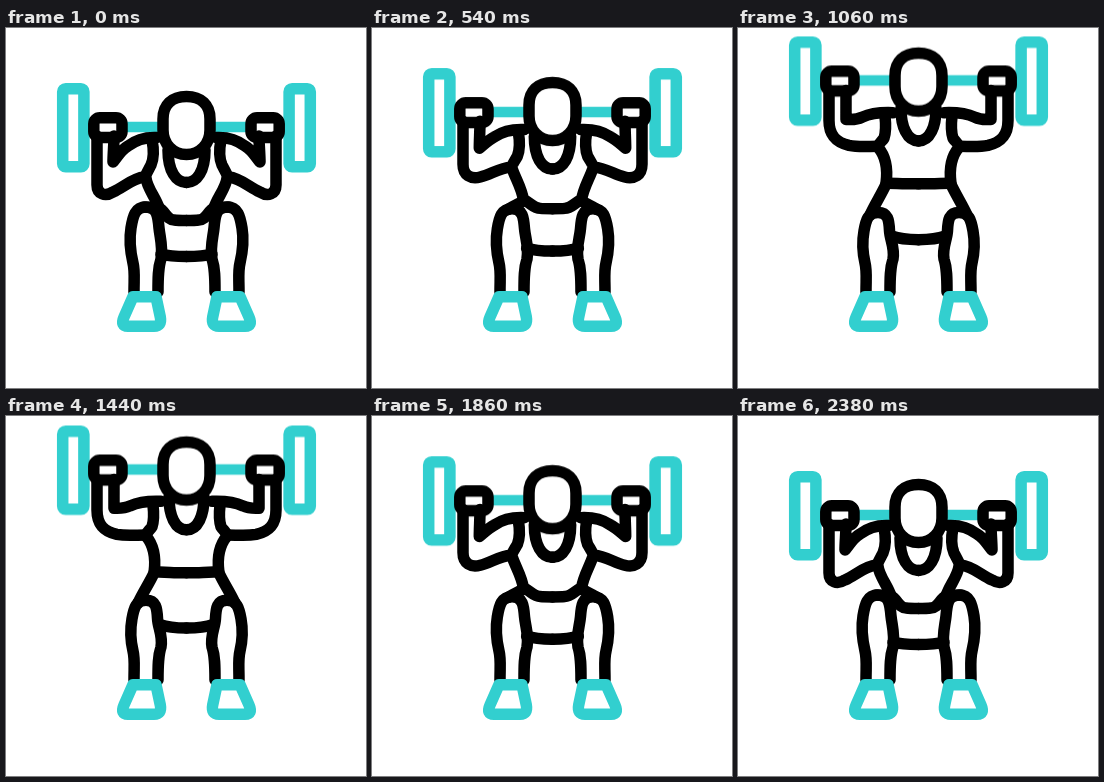
An HTML page without scripts that plays this animation: 360 by 360 pixels, repeating every 2.4 s.

```html
<!DOCTYPE html>
<html lang="en">
<head>
<meta charset="utf-8">
<title>Barbell squat</title>
<style>
  html, body { margin: 0; width: 100%; height: 100%; overflow: hidden; background: #fff; }
  svg { display: block; width: 100%; height: 100%; }
  path, rect { fill: none; stroke: #000; stroke-width: 11.5; stroke-linecap: round; stroke-linejoin: round; }
  .teal { stroke: #32cfcf; }
  .bar { stroke-width: 10.5; }
  .head { fill: #fff; }
  .morph path, .lift { animation: 2.4s cubic-bezier(.76, 0, .24, 1) infinite; }
  .morph path { animation-name: morph; }
  .lift { --rise: -47px; animation-name: lift; }
  .head { --rise: -43.8px; }
  @keyframes morph { 0%, 100% { d: var(--down); } 50% { d: var(--up); } }
  @keyframes lift { 0%, 100% { transform: translateY(0); } 50% { transform: translateY(var(--rise)); } }

  .arm {
    --down: path("M91 108C91 125 91 140 91 157C91 166 99 169 107 164C118 159 127 150 138 149");
    --up: path("M91 62C91 72 91 82 91 92C91 108 99 114 111 117C121 119 130 118 140 118");
  }
  .shoulder {
    --down: path("M108 108C108 117 107 126 107 134C112 128 115 122 122 118C131 111 141 109 151 109.5");
    --up: path("M108 62C108 72 108 82 108 91C113 91 118 92 124 89C133 85 143 84 155 84.5");
  }
  .torso {
    --down: path("M146 112C148 122 148 130 145 137C142 143 139 147 140 150C141 160 150 170 153 180");
    --up: path("M147 88C148 97 148 104 146 110C143 114 140 116 140 119C147 127 150 140 148 155");
  }
  .belt {
    --down: path("M153 180C159 183 161 192 168 192C172 192.5 176 192.5 180.5 192.5");
    --up: path("M149 155C156 155 162 155.5 168 155.5C172 155.5 176 155.5 180.5 155.5");
  }
  .hip {
    --down: path("M153 181C148 180 143 179 138 179");
    --up: path("M148 156C143 167 137 176 132 187");
  }
  .crotch {
    --down: path("M155 226C162 228 171 228.5 180.5 228.5");
    --up: path("M154 208C162 211 171 211.5 180.5 211.5");
  }
  .leg {
    --down: path("M128 264C128 250 129 243 127 235C124 222 123 212 125 200C127 188 129 179 140 179C151 179 152 188 153 200C154 210 157 218 155 231C152 240 152 250 152 264");
    --up: path("M128 264C128 250 129 243 127 235C124 222 124 214 126 203C128 192 130 184.5 140 184.5C150 184.5 151 192 151.5 203C152 212 157 220 155 231C152 240 152 250 152 264");
  }
  .neck {
    --down: path("M162 122C162 143 170 154.5 180.5 154.5");
    --up: path("M163 80C163 98 169 112.5 180.5 112.5");
  }
</style>
</head>
<body>
<svg viewBox="0 0 360 360">
  <defs>
    <g id="weight">
      <path class="teal bar" d="M118 99H180.5"/>
      <rect class="teal" x="56.7" y="60.7" width="21.2" height="78" rx="3"/>
      <rect x="87.8" y="89.7" width="28.2" height="19.8" rx="6"/>
    </g>
    <path id="foot" class="teal" d="M127 268.7H150L154.3 289Q156 298.2 148 298.2H122Q114 298.2 118 289Z"/>
  </defs>

  <g class="lift">
    <use href="#weight"/>
    <use href="#weight" transform="matrix(-1 0 0 1 361 0)"/>
  </g>
  <g class="morph">
    <path class="arm"/><path class="shoulder"/><path class="torso"/><path class="belt"/>
    <path class="hip"/><path class="crotch"/><path class="leg"/><path class="neck"/>
  </g>
  <g class="morph" transform="matrix(-1 0 0 1 361 0)">
    <path class="arm"/><path class="shoulder"/><path class="torso"/><path class="belt"/>
    <path class="hip"/><path class="crotch"/><path class="leg"/><path class="neck"/>
  </g>
  <use href="#foot"/>
  <use href="#foot" transform="matrix(-1 0 0 1 361 0)"/>
  <path class="lift head"
    d="M180.5 68.5C195 68.5 204 77 204 91V102C204 116 194 126.5 180.5 126.5S157 116 157 102V91C157 77 166 68.5 180.5 68.5Z"/>
</svg>
</body>
</html>
```
